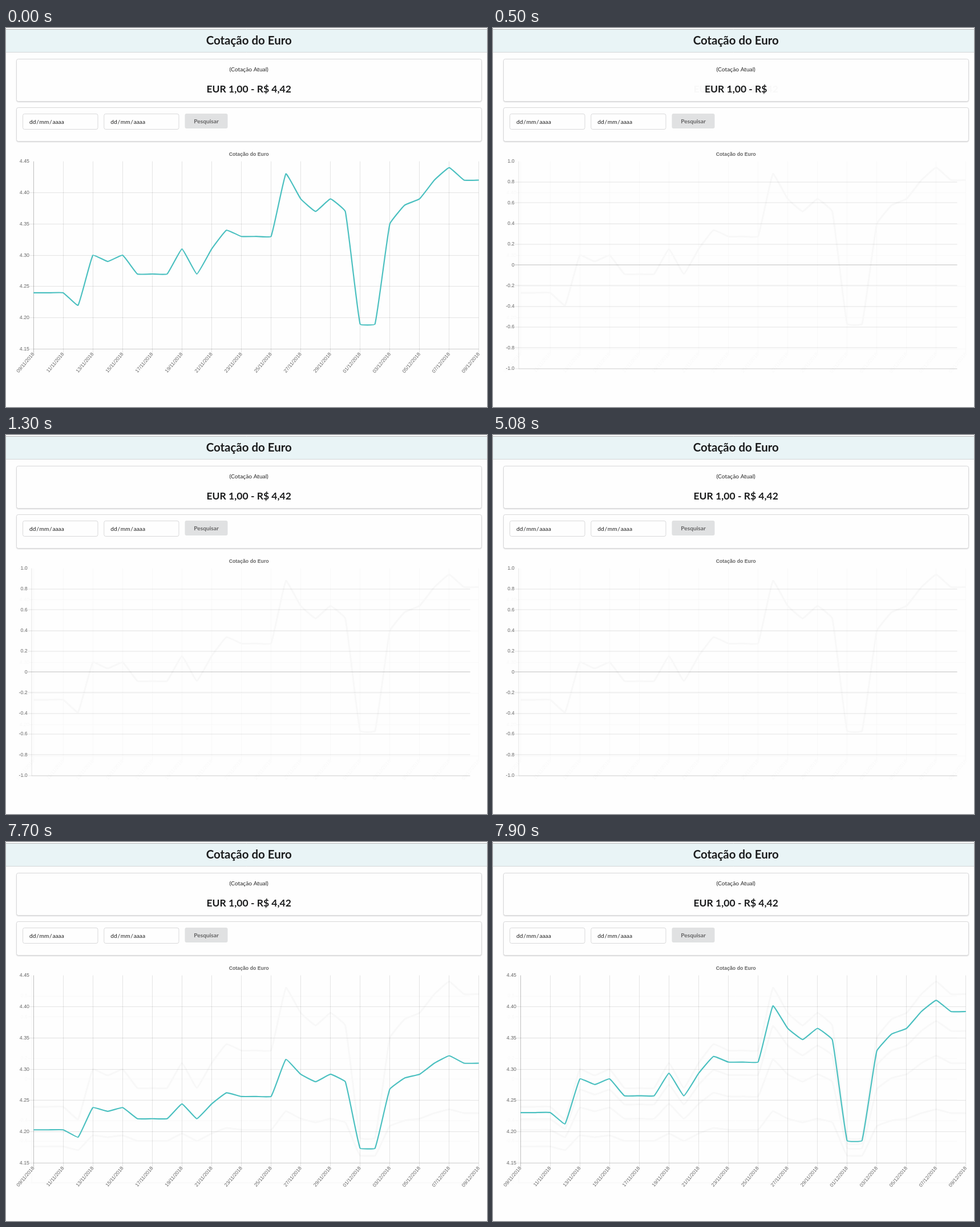
Animation of 843 by 664 pixels, one loop 8 s. Source, as an HTML page with a canvas:

```html
<!DOCTYPE html>
<html lang="pt-BR">
<head>
<meta charset="utf-8">
<title>Cotação do Euro</title>
<style>
  html, body { margin: 0; overflow: hidden; background: #fefefe; }
  canvas { display: block; }
</style>
</head>
<body>
<canvas id="stage" width="843" height="664"></canvas>
<script>
const ctx = document.getElementById('stage').getContext('2d');
const LOOP = 8000, SCALE = 0.73, CENTER = 425.7;
const LATO = 'Lato, sans-serif', ARIAL = '"Liberation Sans", Arial, sans-serif';
const GRID = 'rgba(0,0,0,.1)', ZERO = 'rgba(0,0,0,.25)', GHOST = '#f8f8f8';
const TICK = 10 * SCALE, TOP = 233.6, BOTTOM = 562.6, LEFT = 48.2, STEP = 26.02;

// Daily rates in cents, 9 November to 9 December
const rates = [424, 424, 424, 422, 430, 429, 430, 427, 427, 427, 431, 427, 431, 434, 433, 433,
  433, 443, 439, 437, 439, 437, 419, 419, 435, 438, 439, 442, 444, 442, 442];
const points = rates.map((r, i) => ({ x: LEFT + i * STEP, y: TOP + (445 - r) / 30 * (BOTTOM - TOP) }));

let ghost = false; // paints everything in the faint trail colour
const ink = color => ghost ? GHOST : color;
const crisp = v => Math.floor(v) + 0.5;

function text(str, x, y, size, { font = LATO, weight = 400, color = '#212121', align = 'center', base = 'alphabetic' } = {}) {
  ctx.font = `${weight} ${size * SCALE}px ${font}`;
  ctx.textAlign = align;
  ctx.textBaseline = base;
  ctx.fillStyle = ink(color);
  ctx.fillText(str, x, y);
  return ctx.measureText(str).width;
}

function line(x1, y1, x2, y2, color = GRID) {
  ctx.strokeStyle = ink(color);
  ctx.lineWidth = 1;
  ctx.beginPath();
  ctx.moveTo(x1, y1);
  ctx.lineTo(x2, y2);
  ctx.stroke();
}

function box(x, y, w, h, { fill = '#fefefe', border = '#d9d9da', shadow = false } = {}) {
  ctx.save();
  ctx.beginPath();
  ctx.roundRect(x, y, w, h, 3);
  if (shadow) {
    ctx.shadowColor = 'rgba(34,36,38,.25)';
    ctx.shadowBlur = 2;
    ctx.shadowOffsetY = 1;
  }
  ctx.fillStyle = fill;
  ctx.fill();
  ctx.restore();
  if (border) {
    ctx.lineWidth = 1;
    ctx.strokeStyle = border;
    ctx.stroke();
  }
}

function dateInput(x, width) {
  box(x, 150.5, width, 27);
  let pen = x + 11.5;
  for (const part of ['dd', '/', 'mm', '/', 'aaaa'])
    pen += text(part, pen, 168, 14, { align: 'left' }) + SCALE;
}

function page() {
  ctx.fillStyle = '#fefefe';
  ctx.fillRect(0, 0, 843, 664);
  ctx.fillStyle = '#e9f4f6';
  ctx.fillRect(0, 2, 843, 41);
  line(0, 2.5, 843, 2.5, '#b4b6b7');
  line(0, 42.5, 843, 42.5, '#d2d6d7');
  text('Cotação do Euro', CENTER, 29.3, 28, { weight: 700, color: '#1b1c1d' });
  box(18.5, 54.5, 815, 74, { shadow: true });
  text('(Cotação Atual)', CENTER, 75.5, 14);
  box(18.5, 139.5, 815, 59, { shadow: true });
  dateInput(29.5, 131.5);
  dateInput(171.8, 131.2);
  box(313.5, 150, 75, 26, { fill: '#e0e1e2', border: null });
  text('Pesquisar', 351, 166.5, 14, { weight: 700, color: '#646465' });
  text('Cotação do Euro', CENTER, 223.5, 12, { font: ARIAL, weight: 700, color: '#666' });
}

const price = str => text(str, CENTER, 113, 24, { weight: 700, color: '#1b1c1d' });
const tickLabel = (str, x, y) =>
  text(str, x, y, 12, { font: ARIAL, color: '#666', align: 'right', base: 'middle' });

function rateAxes() {
  const left = crisp(LEFT), right = crisp(points[30].x), bottom = crisp(BOTTOM);
  for (let i = 0; i <= 6; i++) {
    const y = TOP + i * (BOTTOM - TOP) / 6;
    if (i) line(left - TICK, crisp(y), right, crisp(y));
    tickLabel((4.45 - i * 0.05).toFixed(2), LEFT - TICK, y);
  }
  for (let i = 0; i <= 30; i += 2) {
    const x = points[i].x;
    line(crisp(x), TOP, crisp(x), BOTTOM + TICK, i ? GRID : ZERO);
    ctx.save();
    ctx.translate(x, BOTTOM + TICK);
    ctx.rotate(-50 * Math.PI / 180);
    tickLabel(new Date(Date.UTC(2018, 10, 9 + i)).toISOString().slice(0, 10).split('-').reverse().join('/'), 0, 0);
    ctx.restore();
  }
  line(left, bottom, right, bottom);
}

function emptyAxes() {
  for (let i = 0; i <= 10; i++) {
    const y = TOP + i * 36.3, value = 1 - i / 5;
    if (i) line(45.5 - TICK, Math.round(y), 813.5, Math.round(y), i === 5 ? ZERO : GRID);
    tickLabel(i === 5 ? '0' : value.toFixed(1), 45 - TICK, y);
  }
  line(45, TOP, 45, 597);
  line(45, 597, 813.5, 597);
}

// Spline with tension 0.1, its heights scaled up from the bottom axis
function curve(grow) {
  const scaleY = y => BOTTOM + (y - BOTTOM) * grow;
  const handles = points.map((p, i) => {
    const a = points[i - 1] || p, b = points[i + 1] || p;
    const before = Math.hypot(p.x - a.x, p.y - a.y), after = Math.hypot(b.x - p.x, b.y - p.y);
    const at = k => [p.x + k * (b.x - a.x), scaleY(p.y + k * (b.y - a.y))];
    const unit = 0.1 / (before + after);
    return { into: at(-unit * before), out: at(unit * after) };
  });
  ctx.beginPath();
  points.forEach((p, i) => i
    ? ctx.bezierCurveTo(...handles[i - 1].out, ...handles[i].into, p.x, scaleY(p.y))
    : ctx.moveTo(p.x, scaleY(p.y)));
  ctx.strokeStyle = ink('rgb(75,192,192)');
  ctx.lineWidth = ghost ? 3 : 3 * SCALE;
  ctx.stroke();
}

function trail(draw) {
  ghost = true;
  draw();
  ghost = false;
}

const growth = step => 1 - (1 - (0.084 + 0.1165 * step)) ** 4;

function render(t) {
  page();
  const loading = t >= 500 && t < 7600;
  if (t < 500) {
    rateAxes();
    curve(1);
  } else if (loading) {
    trail(() => { rateAxes(); curve(1); });
    emptyAxes();
  } else {
    const step = Math.floor((t - 7600) / 100);
    trail(() => {
      emptyAxes();
      curve(1);
      for (let i = 0; i < step; i++) curve(growth(i));
    });
    rateAxes();
    curve(growth(step));
  }
  if (t >= 500 && t < 1300) {
    trail(() => price('EUR 1,00 - R$ 4,42'));
    price('EUR 1,00 - R$');
  } else {
    price('EUR 1,00 - R$ 4,42');
  }
}

function tick() {
  render(performance.now() % LOOP);
  requestAnimationFrame(tick);
}
tick();
</script>
</body>
</html>
```
